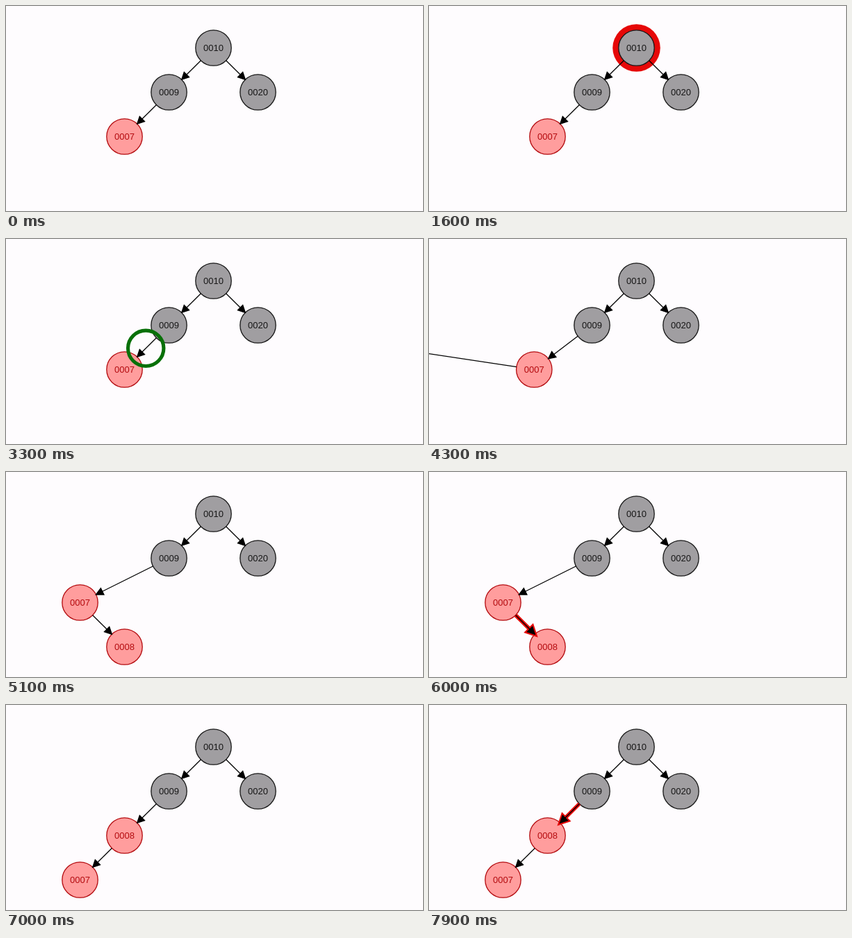
These frames come from a looping animation (600 px wide and 296 px high, 8000 ms). An HTML page with a canvas:

```html
<!DOCTYPE html>
<html lang="en">
<head>
<meta charset="utf-8">
<title>Tree insertion</title>
<style>
html, body { margin: 0; height: 100%; overflow: hidden; background: #fefcfe; }
canvas { display: block; width: 600px; height: 296px; }
</style>
</head>
<body>
<canvas id="stage" width="600" height="296"></canvas>
<script>
const ctx = document.getElementById('stage').getContext('2d');
const LOOP = 8000, TICK = 100;
const RADIUS = 25.7, LINE = 1.3, UNIT = 1.28;
const MOVE_DELAY = 60, MOVE_TIME = 490;

const BLACK = { fill: '#a09ea1', ink: '#181818' };
const RED = { fill: '#ff9d9d', ink: '#b40c10' };
const HIGHLIGHT = '#e60808', RING = '#087008';

// Start time of every step of the insertion.
const START = {
  compare10: 1286, walkTo9: 1850, compare9: 2414, walkTo7: 2985, compare7: 3542,
  attach: 4093, settled: 4670, markLower: 5798, rotate: 6362, rotated: 6926, markUpper: 7490
};

// Grid slots: column c and level r, 64 px apart.
const slot = (c, r) => ({ x: 106.5 + 64 * c, y: 60.5 + 64 * r });
const OFFSTAGE = { x: -523, y: 60.5 };

const during = (t, from, to) => t >= from && t < to;
const progress = (t, start) => Math.min(1, Math.max(0, (t - start - MOVE_DELAY) / MOVE_TIME));
const mix = (a, b, p) => ({ x: a.x + (b.x - a.x) * p, y: a.y + (b.y - a.y) * p });

// Triangle wave between 3 and 7 units.
function pulse(t) {
  const phase = ((t - 1670) / 1860 % 1 + 1) % 1;
  return (3 + 4 * Math.abs(1 - 2 * phase)) * UNIT;
}

function disc(p, r) {
  ctx.beginPath();
  ctx.arc(p.x, p.y, r, 0, 2 * Math.PI);
}

function drawNode(label, p, style, glow) {
  if (glow) {
    ctx.fillStyle = HIGHLIGHT;
    disc(p, RADIUS + glow);
    ctx.fill();
  }
  ctx.fillStyle = style.fill;
  ctx.strokeStyle = style.ink;
  ctx.lineWidth = LINE;
  disc(p, RADIUS);
  ctx.fill();
  ctx.stroke();
  ctx.fillStyle = style.ink;
  ctx.fillText(label, p.x, p.y + 1);
}

function drawRing(p) {
  ctx.strokeStyle = RING;
  ctx.lineWidth = 4 * UNIT;
  disc(p, RADIUS);
  ctx.stroke();
}

function drawArrow(length, width, color) {
  ctx.strokeStyle = ctx.fillStyle = color;
  ctx.lineWidth = width;
  ctx.beginPath();
  ctx.moveTo(RADIUS, 0);
  ctx.lineTo(length, 0);
  ctx.stroke();
  ctx.beginPath();
  ctx.moveTo(length, 0);
  ctx.lineTo(length - 8 * UNIT, 4 * UNIT);
  ctx.lineTo(length - 8 * UNIT, -4 * UNIT);
  ctx.closePath();
  ctx.fill();
  ctx.stroke();
}

function drawEdge(a, b, glow) {
  const length = Math.hypot(b.x - a.x, b.y - a.y) - RADIUS;
  ctx.save();
  ctx.translate(a.x, a.y);
  ctx.rotate(Math.atan2(b.y - a.y, b.x - a.x));
  if (glow) drawArrow(length, glow, HIGHLIGHT);
  drawArrow(length, LINE, '#000');
  ctx.restore();
}

function draw(t) {
  const glow = pulse(t);
  const glowIn = (from, to) => during(t, from, to) ? glow : 0;
  const attach = progress(t, START.attach), rotate = progress(t, START.rotate);

  const n10 = slot(3, 0), n9 = slot(2, 1), n20 = slot(4, 1);
  const leaf = slot(1, 2);
  const n7 = t < START.rotate
    ? mix(leaf, slot(0, 2), attach)
    : mix(slot(0, 2), slot(0, 3), rotate);
  const n8 = t < START.rotate
    ? mix(OFFSTAGE, slot(1, 3), attach)
    : mix(slot(1, 3), leaf, rotate);

  ctx.fillStyle = '#fefcfe';
  ctx.fillRect(0, 0, 600, 296);
  ctx.font = '13px "Liberation Sans", Arial, sans-serif';
  ctx.textAlign = 'center';
  ctx.textBaseline = 'middle';

  drawNode('0010', n10, BLACK, glowIn(START.compare10, START.walkTo9));
  drawNode('0020', n20, BLACK);
  drawNode('0009', n9, BLACK, glowIn(START.compare9, START.walkTo7));
  drawNode('0007', n7, RED, glowIn(START.compare7, START.attach));
  drawNode('0008', n8, RED);

  if (during(t, START.walkTo9, START.compare9)) drawRing(mix(n10, n9, progress(t, START.walkTo9)));
  if (during(t, START.walkTo7, START.compare7)) drawRing(mix(n9, leaf, progress(t, START.walkTo7)));

  drawEdge(n10, n9);
  drawEdge(n10, n20);
  if (t < START.rotate) {
    drawEdge(n9, n7);
    if (t >= START.attach) drawEdge(n7, n8, glowIn(START.markLower, START.rotate));
  } else {
    drawEdge(n9, n8, glowIn(START.markUpper, LOOP));
    drawEdge(n8, n7);
  }
}

const began = performance.now();
function frame() {
  const t = (performance.now() - began) % LOOP;
  draw(Math.floor(t / TICK) * TICK);
  requestAnimationFrame(frame);
}
frame();
</script>
</body>
</html>
```
